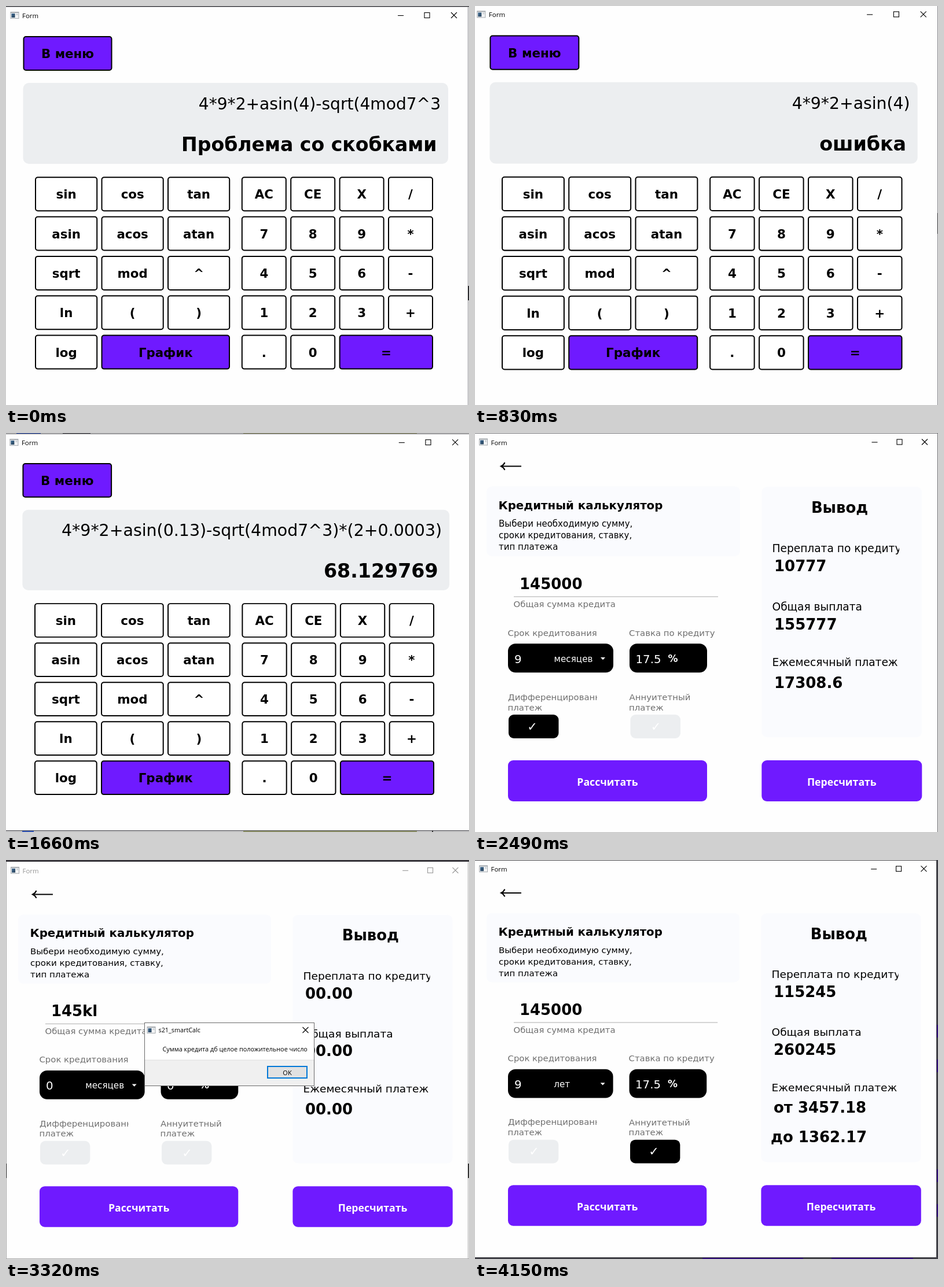
Recreate the animation shown at these times as an HTML page with a canvas. Size 800 by 690 pixels, loop 4980 ms.

```html
<!DOCTYPE html>
<html lang="ru">
<head>
<meta charset="utf-8">
<title>Form</title>
<style>
  html, body { margin: 0; width: 800px; height: 690px; overflow: hidden; background: #fff; }
  canvas { display: block; }
</style>
</head>
<body>
<canvas id="stage" width="800" height="690"></canvas>
<script>
const ctx = document.getElementById('stage').getContext('2d');
const HOLD = 830;
const PURPLE = '#6f1aff', BLACK = '#000', GREY = '#6f6f6f', PALE = '#eceef0', PANEL = '#fafbfe';
const DEJAVU = '"DejaVu Sans", sans-serif';
const OPEN = '"Open Sans", sans-serif';

function rect(x, y, w, h, color) {
  ctx.fillStyle = color;
  ctx.fillRect(x, y, w, h);
}

function round(x, y, w, h, r, fill, stroke) {
  ctx.beginPath();
  ctx.roundRect(x, y, w, h, r);
  ctx.fillStyle = fill;
  ctx.fill();
  if (stroke) {
    ctx.strokeStyle = stroke;
    ctx.lineWidth = 2;
    ctx.stroke();
  }
}

function text(str, x, y, size, { color = BLACK, weight = 400, align = 'left', family = DEJAVU } = {}) {
  ctx.font = `${weight} ${size}px ${family}`;
  ctx.fillStyle = color;
  ctx.textAlign = align;
  ctx.fillText(str, x, y);
}

const bold = (str, x, y, size, align = 'left') => text(str, x, y, size, { weight: 700, align });

function clipped(right, draw) {
  ctx.save();
  ctx.beginPath();
  ctx.rect(0, 0, right, 690);
  ctx.clip();
  draw();
  ctx.restore();
}

function lines(color, width, ...paths) {
  ctx.strokeStyle = color;
  ctx.lineWidth = width;
  ctx.beginPath();
  for (const [x1, y1, x2, y2] of paths) {
    ctx.moveTo(x1, y1);
    ctx.lineTo(x2, y2);
  }
  ctx.stroke();
}

const cross = (x, y, r, color) =>
  lines(color, 1.1, [x - r, y - r, x + r, y + r], [x - r, y + r, x + r, y - r]);

function windowIcon(x, y) {
  rect(x, y, 15, 12, '#a4a9ae');
  rect(x + 1, y + 2, 13, 9, '#f4f5f6');
  const blue = ctx.createLinearGradient(x, y + 3, x + 6, y + 10);
  blue.addColorStop(0, '#3d6f9c');
  blue.addColorStop(1, '#2c4760');
  rect(x + 2, y + 3, 6, 7, blue);
  rect(x + 10, y + 3, 3, 3, '#cfd4d8');
}

function titleBar(x, y, buttons, color) {
  windowIcon(x - 20.5, y - 6);
  text('Form', x, y + 5, 11.4, { family: OPEN, color });
  const [min, max, close] = buttons;
  lines(color, 1.1, [min - 5, y + 0.5, min + 5, y + 0.5]);
  ctx.strokeRect(max - 4.5, y - 4.5, 9, 9);
  cross(close, y, 5, color);
}

function key(label, x, y, w, fill = '#fff') {
  round(x + 1, y + 1, w - 2, 58, 4, fill, BLACK);
  bold(label, x + w / 2, y + 38, 21.3, 'center');
}

const ROWS = [
  ['sin', 'cos', 'tan', 'AC', 'CE', 'X', '/'],
  ['asin', 'acos', 'atan', '7', '8', '9', '*'],
  ['sqrt', 'mod', '^', '4', '5', '6', '-'],
  ['ln', '(', ')', '1', '2', '3', '+'],
  ['log', 'График', '', '.', '0', '=', ''],
];
const COLUMNS = [50, 164.5, 279, 406.8, 491.2, 575.6, 660];
const WIDE = { 'График': 222.5, '=': 162.4 };

function calculator({ expression, result, size = 28.1 }) {
  titleBar(28, 16, [682, 727.5, 774], BLACK);
  key('В меню', 29.5, 52, 154, PURPLE);
  round(29.5, 133, 734.5, 140, 10, PALE);
  text(expression, 751, 179, size, { align: 'right' });
  bold(result, 744.5, 251, 33.1, 'right');
  ROWS.forEach((row, r) => row.forEach((label, c) => {
    if (!label) return;
    const width = WIDE[label] || (c < 3 ? 108.2 : 78);
    key(label, COLUMNS[c], 295.2 + r * 68.35, width, WIDE[label] ? PURPLE : '#fff');
  }));
}

function backArrow() {
  lines(BLACK, 2, [46, 57.5, 80, 57.5]);
  ctx.beginPath();
  ctx.moveTo(51.5, 51);
  ctx.quadraticCurveTo(49.5, 55.5, 45, 57.5);
  ctx.quadraticCurveTo(49.5, 59.5, 51.5, 64);
  ctx.stroke();
}

function checkBox(x, on) {
  round(x, 487, 86.5, 41, 9, on ? BLACK : PALE);
  text('✓', x + (on ? 41 : 44), 515, 21, { color: '#fff', align: 'center' });
}

const label = (str, x, y) => text(str, x, y, 14.9, { color: GREY });
const amount = (str, x, y) => bold(str, x, y, 26);

function action(str, x, w) {
  round(x, 566, w, 71, 9, PURPLE);
  text(str, x + w / 2, 610, 17.7, { color: '#fff', weight: 700, family: OPEN, align: 'center' });
}

function credit({ sum, term, unit, rate, kind, overpay, total, monthly, ink = BLACK }) {
  const white = { color: '#fff' };
  titleBar(27.5, 15.5, [690.5, 733.5, 777], ink);
  backArrow();

  round(20, 92.5, 438, 120.5, 9, PANEL);
  bold('Кредитный калькулятор', 40.5, 132, 19.8);
  ['Выбери необходимую сумму,', 'сроки кредитования, ставку,', 'тип платежа']
    .forEach((line, i) => text(line, 41, 162 + i * 20.2, 15));

  amount(sum, 77, 270);
  rect(67, 282.5, 353, 1.1, '#b4b4b4');
  label('Общая сумма кредита', 66.5, 301);

  label('Срок кредитования', 56.5, 350.5);
  round(57, 364.3, 182, 50, 13, BLACK);
  text(term, 68, 397.5, 19.8, white);
  text(unit, 136.5, 396, 15.2, white);
  ctx.beginPath();
  ctx.moveTo(217, 388);
  ctx.lineTo(225, 388);
  ctx.lineTo(221, 392.2);
  ctx.fill();

  label('Ставка по кредиту', 266, 350.5);
  round(267, 364.3, 134, 50, 13, BLACK);
  text(rate, 277.5, 397.5, 19.8, white);
  text('%', 333.5, 396, 17, { color: '#fff', weight: 700 });

  clipped(211, () => label('Дифференцированный', 57, 461.5));
  label('платеж', 56.5, 479.5);
  label('Аннуитетный', 266.5, 462);
  label('платеж', 266, 479.5);
  checkBox(58, kind === 'diff');
  checkBox(268.5, kind === 'annuity');

  round(495.5, 93, 276.5, 433, 9, PANEL);
  bold('Вывод', 630, 138, 25.9, 'center');
  clipped(733, () => text('Переплата по кредиту', 513.5, 206, 18.6));
  amount(overpay, 517, 239);
  text('Общая выплата', 513.5, 306.5, 18.6);
  amount(total, 517, 339.5);
  text('Ежемесячный платеж', 513.5, 402.5, 18.6);
  monthly.forEach((line, i) => amount(line, i ? 512 : 517, 440.5 + i * 50.5));

  action('Рассчитать', 57, 344);
  action('Пересчитать', 495.3, 277);
}

function dialog() {
  rect(239.5, 281, 293, 109.5, '#fff');
  rect(240, 346, 292, 44, '#f0f0f0');
  rect(240, 345.5, 292, 1, '#dfdfdf');
  ctx.lineWidth = 1;
  ctx.strokeStyle = '#6a6a6a';
  ctx.strokeRect(239.5, 281.5, 293, 109);
  windowIcon(243.5, 288);
  text('s21_smartCalc', 263.5, 298, 10.8, { family: OPEN });
  cross(517.5, 294, 5, BLACK);
  text('Сумма кредита дб целое положительное число', 270.5, 331, 10.85, { family: OPEN });
  rect(451, 356, 70, 22, '#0078d7');
  rect(453, 358, 66, 18, '#e1e1e1');
  text('OK', 486, 371.5, 11, { family: OPEN, align: 'center' });
}

// map: [scaleX, offsetX, scaleY, offsetY]; edges: strips of desktop around the window
const SCENES = [
  {
    map: [1, 0, 1, 0],
    edges: [[0, 0, 800, 1.5, '#3a3a3e'], [798, 1, 1, 689, '#85858a'], [798, 484, 2, 25, '#2a2a2e']],
    draw: () => calculator({ expression: '4*9*2+asin(4)-sqrt(4mod7^3', result: 'Проблема со скобками' }),
  },
  {
    map: [1.00654, -4.33, 1.0042, -1.7],
    edges: [[799, 0, 1, 690, '#85858a'], [799, 358, 1, 36, '#2a2a2e']],
    draw: () => calculator({ expression: '4*9*2+asin(4)', result: 'ошибка' }),
  },
  {
    map: [1.00436, -1.2, 0.9957, 0.2],
    edges: [
      [0, 0, 800, 1, '#c9c9c9'], [18, 0, 42, 1, '#3558b8'], [98, 0, 48, 1, '#55555a'],
      [410, 0, 300, 1, '#9a9a70'], [0, 1, 800, 1, '#66666a'],
      [0, 687, 800, 1.5, '#55555a'], [0, 688.5, 800, 1.5, '#c9c9c9'],
      [28, 688, 20, 2, '#3558b8'], [410, 688, 300, 2, '#8d9068'], [736, 688, 2, 2, '#333'],
    ],
    draw: () => calculator({
      expression: '4*9*2+asin(0.13)-sqrt(4mod7^3)*(2+0.0003)', result: '68.129769', size: 28.3,
    }),
  },
  {
    map: [1, 0, 1, 0],
    edges: [[0, 0, 800, 1, '#77777b'], [799, 0, 1, 690, '#6c6c70']],
    draw: () => credit({
      sum: '145000', term: '9', unit: 'месяцев', rate: '17.5', kind: 'diff',
      overpay: '10777', total: '155777', monthly: ['17308.6'],
    }),
  },
  {
    map: [0.9979, 1.1, 0.99266, 2.4],
    edges: [
      [0, 0, 800, 3, '#39373d'], [0, 3, 1, 687, '#a9a9a9'], [798, 3, 1, 687, '#a9a9a9'],
      [0, 689, 800, 1, '#a9a9a9'], [0, 525, 1, 25, '#222'], [798, 525, 2, 25, '#333'],
    ],
    draw: () => credit({
      sum: '145kl', term: '0', unit: 'месяцев', rate: '0', ink: '#969696',
      overpay: '00.00', total: '00.00', monthly: ['00.00'],
    }),
    overlay: dialog,
  },
  {
    map: [0.9979, 0.12, 0.99358, -0.2],
    edges: [
      [0, 0, 800, 1, '#4a4a4e'], [797, 0, 3, 690, '#3f3f45'], [0, 687, 800, 3, '#3f3f45'],
      [393, 688, 174, 2, '#32107a'], [616, 688, 141, 2, '#32107a'],
      ...[285, 345, 535, 595].map(y => [798, y, 2, 22, '#32107a']),
    ],
    draw: () => credit({
      sum: '145000', term: '9', unit: 'лет', rate: '17.5', kind: 'annuity',
      overpay: '115245', total: '260245', monthly: ['от 3457.18', 'до 1362.17'],
    }),
  },
];

function paint({ map: [sx, dx, sy, dy], edges, draw, overlay }) {
  ctx.setTransform(1, 0, 0, 1, 0, 0);
  rect(0, 0, 800, 690, '#fefefe');
  edges.forEach(edge => rect(...edge));
  ctx.setTransform(sx, 0, 0, sy, dx, dy);
  draw();
  ctx.setTransform(1, 0, 0, 1, 0, 0);
  if (overlay) overlay();
}

const start = performance.now();
function tick() {
  const step = Math.floor((performance.now() - start) / HOLD);
  paint(SCENES[step % SCENES.length]);
  requestAnimationFrame(tick);
}
tick();
</script>
</body>
</html>
```
